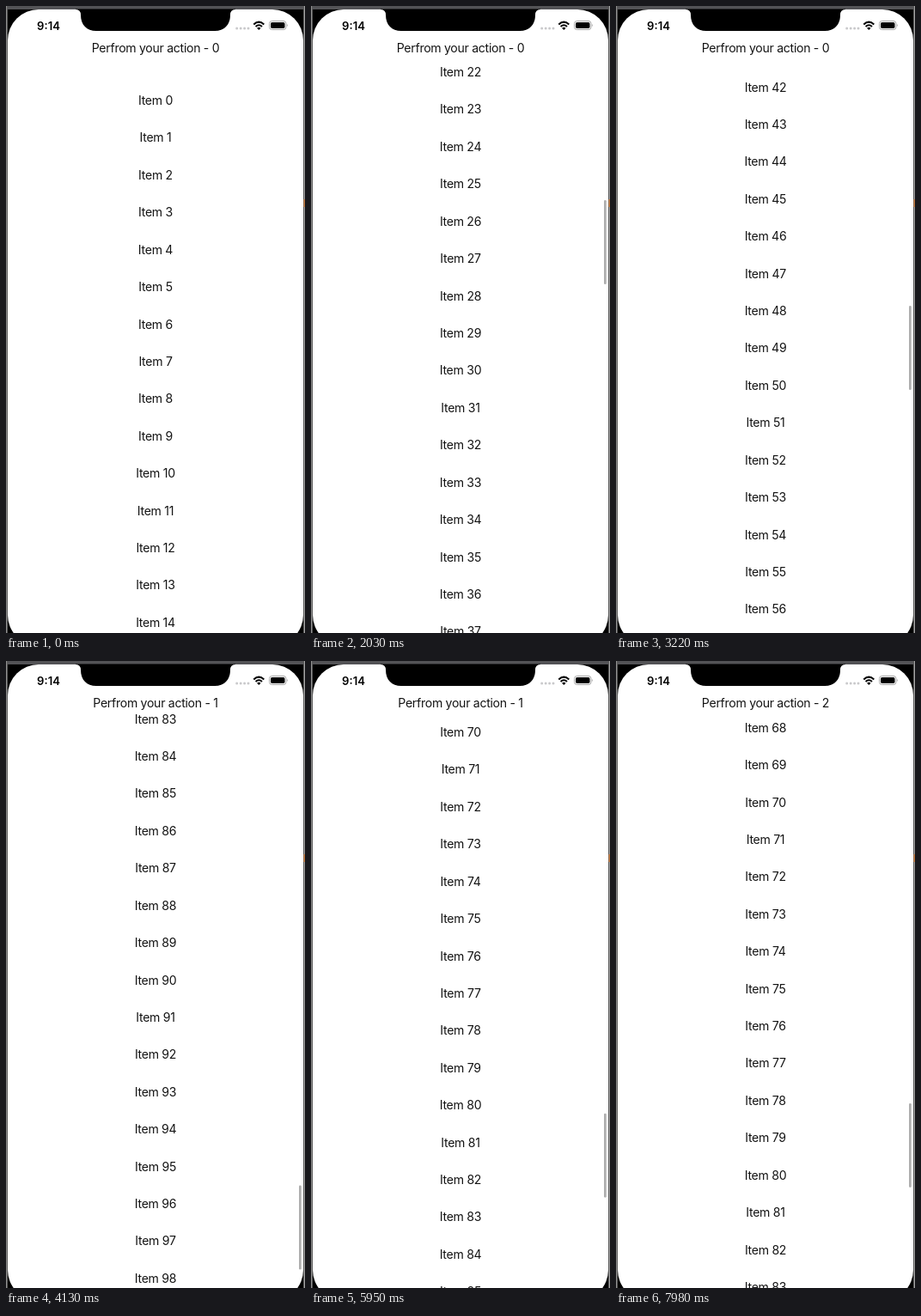
An HTML page that plays this animation: 348 px wide and 730 px high, repeating every 8000 ms.

```html
<!DOCTYPE html>
<html lang="en">
<head>
<meta charset="utf-8">
<title>Scrolling list</title>
<style>
html, body { margin: 0; width: 100%; height: 100%; overflow: hidden; background: #000; }
svg { display: block; width: 348px; height: 730px; }
text { font-family: Inter, Roboto, "Liberation Sans", sans-serif; font-size: 14.1px; letter-spacing: -0.3px; text-anchor: middle; fill: #141414; }
.clock { font-size: 13.1px; font-weight: 600; letter-spacing: 0; fill: #000; }
</style>
</head>
<body>
<svg viewBox="0 0 348 730">
  <defs>
    <clipPath id="view"><rect x="2" y="62" width="344" height="668"/></clipPath>
  </defs>
  <!-- phone body and screen -->
  <rect width="348" height="730" fill="#000"/>
  <rect width="348" height="4" fill="#535356"/>
  <rect width="1" height="730" fill="#8c8c8c"/>
  <rect x="1" width="1" height="730" fill="#5a5a5a"/>
  <rect x="346" width="1" height="730" fill="#5a5a5a"/>
  <rect x="347" width="1" height="730" fill="#a2a2a2"/>
  <rect x="346.5" y="225" width="1.5" height="9" fill="#c77f45"/>
  <rect x="2" y="4" width="344" height="741" rx="36" fill="#fff"/>
  <path d="M81 3.5V4Q87 4 87 10.500C87 22 94 29 105 29H243C254 29 261 22 261 10.500Q261 4 267 4V3.500Z" fill="#000"/>
  <!-- status bar -->
  <text class="clock" x="49.500" y="27.600">9:14</text>
  <g fill="#c9c9cb">
    <circle cx="268.700" cy="26" r="1.500"/><circle cx="273.200" cy="26" r="1.500"/>
    <circle cx="277.600" cy="26" r="1.500"/><circle cx="282" cy="26" r="1.500"/>
  </g>
  <g fill="none" stroke="#000" stroke-width="2">
    <path d="M288.300 21.400Q294.300 15.800 300.300 21.400"/>
    <path d="M290.600 23.900Q294.300 20.500 298 23.900"/>
  </g>
  <path d="M294.300 28L292.100 25.700Q294.300 24 296.500 25.700Z" fill="#000"/>
  <rect x="306.500" y="17.500" width="19.500" height="10" rx="3" fill="none" stroke="#a6a6a6"/>
  <rect x="308" y="19" width="16.500" height="7" rx="1.700" fill="#000"/>
  <path d="M327 20.800Q328.700 22.500 327 24.200Z" fill="#a6a6a6"/>

  <text id="title" x="174" y="54"></text>
  <g id="list" clip-path="url(#view)"></g>
  <rect id="bar" x="341" width="2.700" rx="1.350" fill="#aeaeae"/>
</svg>
<script>
const LOOP = 8000, STEP = 70, PITCH = 43.42, COUNT = 100, END = 3716.6;
const FIRST = 115, ROWS = 18;

// [time, scroll offset]: four flicks down, then back and forth near the end
const keys = [
  [770, 0], [840, 36], [910, 140], [1050, 370], [1260, 545], [1610, 635], [1680, 635],
  [1750, 664], [1820, 745], [2030, 988.2], [2240, 1160], [2520, 1290], [2660, 1330],
  [2730, 1385], [2940, 1630], [3220, 1839.1], [3360, 1910],
  [3500, 2060], [3640, 2420], [3850, 3050], [4060, 3540], [4200, 3715], [4340, 3765],
  [4690, 3728], [4900, 3716], [4970, 3660], [5040, 3565], [5110, 3414.8],
  [5250, 3240], [5460, 3100], [5740, 3024], [5810, 3024],
  [5880, 3036], [5950, 3066.4], [6090, 3270], [6230, 3520], [6370, 3715], [6450, 3768],
  [6650, 3724], [6930, END], [7070, END], [7140, 3658], [7210, 3530.5],
  [7350, 3320], [7560, 3140], [7770, 3040], [7980, 2984.9]
];

const slope = i => (keys[i + 1][1] - keys[i][1]) / (keys[i + 1][0] - keys[i][0]);

// Harmonic mean keeps the curve free of overshoot
function tangent(i) {
  if (i === 0 || i === keys.length - 1) return 0;
  const a = slope(i - 1), b = slope(i);
  return a * b > 0 ? 2 * a * b / (a + b) : 0;
}

function scrollAt(t) {
  const last = keys.length - 1;
  if (t <= keys[0][0]) return 0;
  if (t >= keys[last][0]) return keys[last][1];
  let i = 0;
  while (keys[i + 1][0] <= t) i++;
  const [t0, s0] = keys[i], [t1, s1] = keys[i + 1];
  const d = t1 - t0, u = (t - t0) / d, v = 1 - u;
  return s0 * v * v * (1 + 2 * u) + s1 * u * u * (3 - 2 * u)
    + d * u * v * (tangent(i) * v - tangent(i + 1) * u);
}

const title = document.getElementById("title");
const list = document.getElementById("list");
const bar = document.getElementById("bar");
const rows = Array.from({ length: ROWS }, () => {
  const row = document.createElementNS("http://www.w3.org/2000/svg", "text");
  row.setAttribute("x", 174);
  return list.appendChild(row);
});

function draw(t) {
  const s = scrollAt(t);
  const actions = (t >= 4130) + (t >= 6370);
  title.textContent = "Perfrom your action - " + actions;

  const top = Math.max(0, Math.floor((s - 70) / PITCH));
  rows.forEach((row, k) => {
    const n = top + k;
    row.textContent = n < COUNT ? "Item " + n : "";
    row.setAttribute("y", (FIRST + n * PITCH - s).toFixed(2));
  });

  // The bar shrinks while the list is pulled past its end
  const over = Math.max(0, s - END);
  bar.setAttribute("y", 83 + 0.1447 * (s - over) + over * 0.5);
  bar.setAttribute("height", 98 - over * 0.5);
  bar.setAttribute("opacity", t < 840 ? 0 : 1);
}

const start = performance.now();
function tick() {
  const t = (performance.now() - start) % LOOP;
  draw(Math.floor(t / STEP) * STEP);
  requestAnimationFrame(tick);
}
draw(0);
requestAnimationFrame(tick);
</script>
</body>
</html>
```
